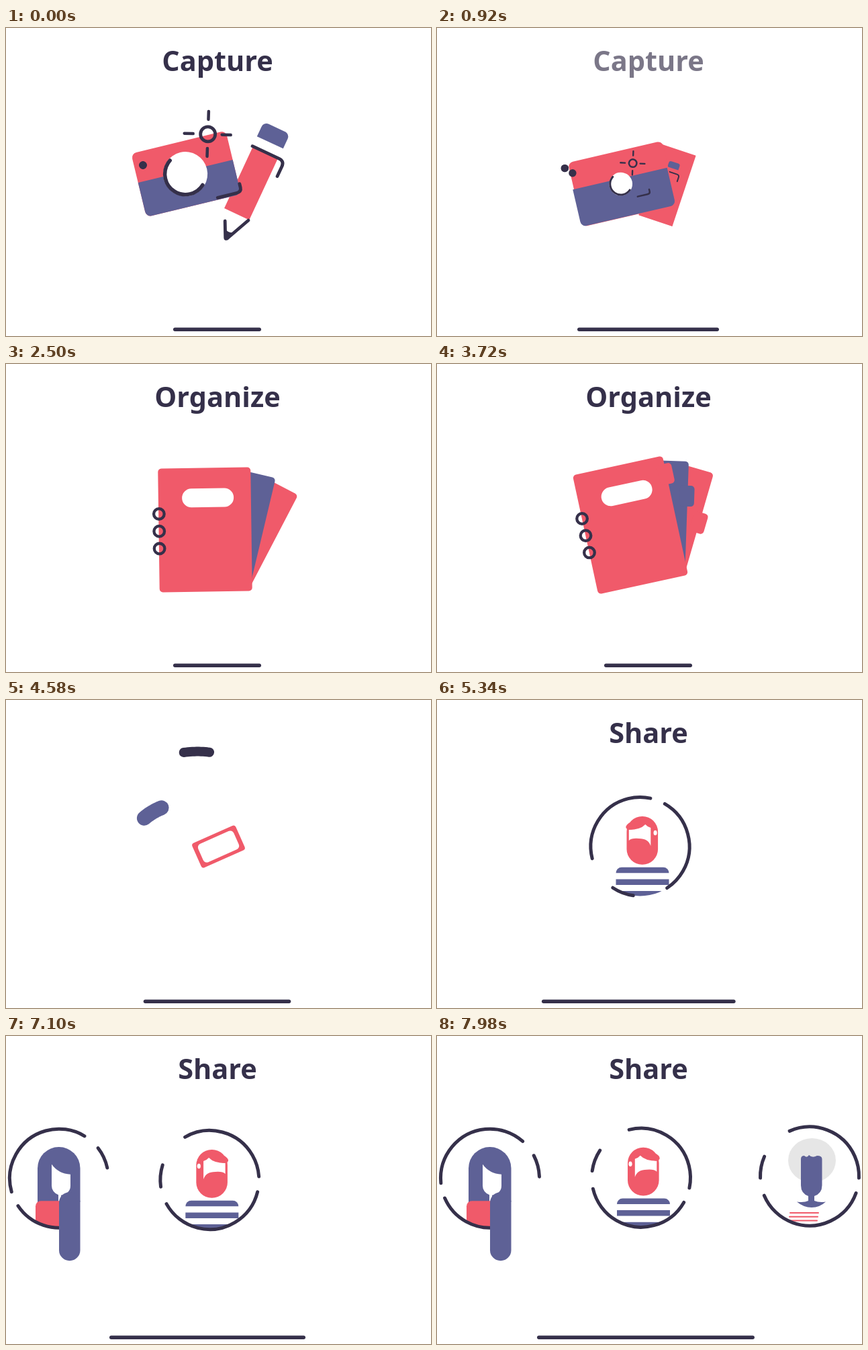
Write an HTML page with a canvas that moves like this. It is 633 px wide and 458 px high and loops after 8 s.

```html
<!DOCTYPE html>
<html lang="en">
<head>
<meta charset="utf-8">
<title>Capture, Organize, Share</title>
<style>
html, body { margin: 0; width: 100%; height: 100%; overflow: hidden; background: #fff; }
canvas { display: block; }
</style>
</head>
<body>
<canvas id="stage" width="633" height="458"></canvas>
<script>
const ctx = document.getElementById('stage').getContext('2d');
const DARK = '#35304a', RED = '#f05a6a', BLUE = '#5e6196', WHITE = '#fff', GRAY = '#e6e6e6';
const LOOP = 8000, RAD = Math.PI / 180, RING = 73.5;

const ramp = (t, from, to) => Math.max(0, Math.min(1, (t - from) / (to - from)));
const ease = (t, from, to) => { const p = ramp(t, from, to); return p * p * (3 - 2 * p); };
const pulse = (t, from, to) => Math.sin(Math.PI * ramp(t, from, to));
const mix = (a, b, p) => a + (b - a) * p;

// Eases a pose through steps of the form [from, to, next pose]; it rests between them.
const stages = (t, pose, ...steps) => steps.reduce(
  (now, [from, to, next]) => now.map((v, i) => mix(v, next[i], ease(t, from, to))), pose);

function at(x, y, angle, draw, sx = 1, sy = sx) {
  ctx.save();
  ctx.translate(x, y);
  ctx.rotate(angle * RAD);
  ctx.scale(sx, sy);
  draw();
  ctx.restore();
}
function turned(x, y, angle) {
  const c = Math.cos(angle * RAD), s = Math.sin(angle * RAD);
  return [x * c - y * s, x * s + y * c];
}
function fill(d, color) { ctx.fillStyle = color; ctx.fill(new Path2D(d)); }
function stroke(d, width = 4.8) {
  ctx.strokeStyle = DARK; ctx.lineWidth = width;
  ctx.stroke(new Path2D(d));
}
function box(x, y, w, h, r, color) {
  if (w < 0.5 || h < 0.5) return;
  ctx.fillStyle = color;
  ctx.beginPath(); ctx.roundRect(x, y, w, h, r); ctx.fill();
}
function oval(x, y, rx, ry, color, angle = 0) {
  ctx.fillStyle = color;
  ctx.beginPath(); ctx.ellipse(x, y, rx, ry, angle * RAD, 0, 7); ctx.fill();
}
function arc(x, y, r, start, length, width = 5) {
  if (length <= 0 || width <= 0) return;
  ctx.strokeStyle = DARK; ctx.lineWidth = width;
  ctx.beginPath(); ctx.arc(x, y, r, start * RAD, (start + length) * RAD); ctx.stroke();
}

// A thick trail that follows a spiral around a point.
function swoosh(t, x, y, color, width, [from, to], [r0, r1], [a0, a1]) {
  const head = ramp(t, from, to);
  if (head <= 0 || head >= 1) return;
  ctx.strokeStyle = color;
  ctx.lineWidth = width * Math.min(1, head * 5, (1 - head) * 5);
  ctx.beginPath();
  for (let i = 0; i <= 12; i++) {
    const p = Math.max(0, head - 0.01 * i);
    const [dx, dy] = turned(mix(r0, r1, p), 0, mix(a0, a1, p));
    ctx.lineTo(x + dx, y + dy);
  }
  ctx.stroke();
}

function titles(t) {
  ctx.textAlign = 'center';
  ctx.font = '700 41.5px "Noto Sans", "Open Sans", sans-serif';
  ctx.fillStyle = DARK;
  for (const [text, start, end] of [['Capture', -400, 800], ['Organize', 1400, 4050], ['Share', 4600, LOOP]]) {
    ctx.globalAlpha = ramp(t, start, start + 400) - ramp(t, end, end + 350);
    ctx.fillText(text, 315, 63.5);
  }
  ctx.globalAlpha = 1;
}

function underline(t) {
  const half = 65.5 + 66 * pulse(t, 700, 1768) + 81 * pulse(t, 4000, 4712);
  const [left, right] = stages(t, [314.5 - half, 314.5 + half], [4712, 5400, [154, 446]], [7500, 8000, [149, 473]]);
  box(left, 445.5, right - left, 5.5, 2.75, DARK);
}

const sway = t => t < 700 ? Math.sin(t / 350 * Math.PI) : 0;

// The pencil's body, which becomes the binder's cover and then a head: centre, angle, size, radius.
const coverPose = t => stages(t, [365, 231, 25 - sway(t), 41, 101, 0],
  [750, 1520, [189.5, 255, -26.6, 136, 181, 6]],
  [1520, 2450, [296.5, 246.5, -0.8, 138, 184, 5]],
  [2500, 3400, [288, 239.5, -12.2, 137, 181, 5]],
  [4050, 4580, [316.5, 218, -24, 71, 40, 4]],
  [4580, 5200, [306, 209, 0, 46.5, 71.5, 23]]);

// The camera's two halves, which become pages fanned from the cover's lower right corner.
function pagePose(t, i) {
  const [x, y, angle, w, h] = coverPose(t);
  const [dx, dy] = turned(0.47 * w, 0.478 * h, angle);
  const fan = [x + dx, y + dy, angle + 14.2 * i];
  return stages(t, [350, 247, -13.6 + sway(t), 145, 97, 8],
    [750, 1520, [380 + 14 * i, 376, -9.2, 138, 104, 5]],
    [1520, 2450, [...fan, 55, h * (0.98 - 0.065 * i), 5]],
    [4050, 4350, [...fan, 0, 0, 0]]);
}

function tab(t, x, y, color) {
  const out = 10 * (ease(t, 3350, 3700) - ease(t, 4050, 4250));
  if (out > 0.1) box(x - 12, y, 12 + out, 31, 5, color);
}

function pages(t) {
  const whole = ease(t, 850, 1250), tools = 1 - ease(t, 800, 1050);
  for (const i of [2, 1]) {
    const [x, y, angle, w, h, r] = pagePose(t, i), color = i === 2 ? RED : BLUE;
    const cut = i === 1 ? 44.5 * (1 - whole) : 0;
    if (w > 1) at(x, y, angle, () => {
      box(-w, cut - h, w, h - cut, cut > 1 ? [0, 0, r, r] : r, color);
      tab(t, 0, 12 + 25 * i - h - 1, color);
    });
  }
  const [x, y, angle, w, h] = pagePose(t, 1);
  if (tools > 0) at(x, y, angle, () => at(-w / 2, -h / 2, 0, () => {
    stroke('M37.5 45.5H66Q74 45.5 74 39V33');
    oval(-1, 0, 33, 33, WHITE);
    arc(-1, 0, 30.5, 46, 189, 5.5);
    at(45.5, -49.7, 15.6, () => {
      arc(0, 0, 11, 0, 360, 4.8);
      stroke('M0-34V-22M0 21V33M-35 0H-22M21 0H34', 4.5);
    });
  }, tools));
}

function cover(t) {
  if (t >= 5200) return;
  const [x, y, angle, w, h, r] = coverPose(t), tools = 1 - ease(t, 750, 1050);
  const [lx, ly, lw, lh, lr] = stages(t, [4.8, -47.5, 0, 0, 0],
    [1900, 2400, [4.8, -47.5, 77, 28, 14]],
    [4050, 4580, [0, 0, 58, 30, 6]],
    [4580, 5200, [-3.5, -9, 33, 24, 4]]);
  at(x, y, angle, () => {
    box(-w / 2, -h / 2, w, h, r, RED);
    tab(t, w / 2, 12 - h / 2, RED);
    box(lx - lw / 2, ly - lh / 2, lw, lh, lr, WHITE);
    if (tools > 0) at(0, 0, 0, () => {
      box(-21.5, -91, 43, 24, [8, 8, 0, 0], BLUE);
      stroke('M-21.5-51H22Q31-51 31-42V-26');
      fill('M-6 78Q0 81 6 78L1 93Z', DARK);
      stroke('M-11.6 67L-.5 89.5Q1 92 3 88L19.6 51.5');
    }, tools);
  });
}

// The camera's dot splits into three, which open into binder rings.
function rings(t) {
  const [x, y, angle] = coverPose(t);
  const open = ease(t, 1520, 2400), size = 1 - ease(t, 4050, 4300);
  for (let i = 0; i < 3; i++) {
    const [dx, dy] = turned(-68.3, -24.5 + 25.8 * i, angle);
    const [cx, cy] = stages(t, [204, 204],
      [800, 1520, i === 1 ? [176, 361] : [22.5, 265]], [1520, 2400, [x + dx, y + dy]]);
    arc(cx, cy, mix(2.8, 7.8, open) * size, 0, 360, mix(5.8, 4.3, open) * size);
  }
}

function paperclip(t) {
  const u = (t - 1520) / 500;
  at(337 - 12 * u, 38 - 80 * u * u, 29, () => {
    ctx.strokeStyle = DARK; ctx.lineWidth = 3.6;
    ctx.beginPath(); ctx.roundRect(-9, -26.5, 18, 53, 9); ctx.stroke();
  });
}

// Three dashes drawn by a growing pen; the last one may lag behind.
function dashedRing(x, y, rotation, pen, lastPen = pen) {
  const last = Math.min(116, 137 * lastPen);
  arc(x, y, RING, rotation, 137 * pen);
  arc(x, y, RING, rotation + 158, Math.min(25.5, 137 * pen));
  arc(x, y, RING, rotation + 342 - last, last);
}
function insideRing(draw) {
  ctx.save();
  ctx.beginPath(); ctx.arc(0, 0, RING, 0, 7); ctx.clip();
  draw();
  ctx.restore();
}

function beardedMan(t) {
  swoosh(t, 302, 218, DARK, 14, [4350, 5100], [152, 114], [231, 359]);
  swoosh(t, 302, 218, BLUE, 22, [4350, 5250], [121, 4], [186, 316]);
  if (t < 4950) return;
  const [x, y] = stages(t, [302.5, 218], [6200, 7900, [304, 210.7]]);
  const drop = 45 * (1 - ease(t, 5000, 5300));
  at(x, y, 0, () => {
    insideRing(() => {
      for (let i = 0; i < 3; i++) box(-36, 30.8 + 17.6 * i + drop, 79, 8.5, i ? 0 : [9, 9, 0, 0], BLUE);
    });
    if (t >= 5200) at(3.3, 0, 0, () => {
      box(-23.3, -45, 46.6, 71.8, 23, RED);
      fill('M-20-25Q-3-25 4.5-33Q8-29 12.5-28V-1Q9-12-5-12Q-16-13-20-9Z', WHITE);
      oval(-14.5, -31.5, 10.5, 5.5, RED, -20);
      oval(19.3, -20.5, 2.6, 3.8, WHITE);
    }, mix(1, -1, ease(t, 6750, 7050)), 1);
  });
  const spin = 0.0181 * (t - 6160) - 90 * (1 - ease(t, 4950, 5700));
  dashedRing(x, y, spin - 3, ease(t, 5000, 5450));
}

function longHair(t) {
  const pop = ease(t, 6380, 6620), y = 211.7, x = mix(83, 79, ease(t, 6160, 6800));
  const pen = 0.41 * ease(t, 5950, 6160) + 0.59 * ease(t, 6160, 6700);
  at(x, y, 0, () => {
    box(-32, -46.7, 63.5, 82, [31.7, 31.7, 0, 0], BLUE);
    fill('M-11-21Q-1-7 17-6V11A14 14 0 0 1 3 25V36H-1V24.5A14 14 0 0 1-11 11Z', WHITE);
    insideRing(() => box(-35, 33.5, 66, 50, [8, 8, 0, 0], RED));
  }, pop);
  dashedRing(x, y, 174.5 + 0.0118 * (t - 7980), pen, 0.55 * ease(t, 6250, 6800));
  if (pop > 0) at(x, y, 0, () => box(0, 20.5, 31.5, mix(32, 102, ease(t, 6600, 7050)), 15.7, BLUE), pop);
  swoosh(t, 79, 212, BLUE, 33, [5800, 6500], [83, 37], [-136, 72]);
  swoosh(t, 79, 212, RED, 23, [5800, 6500], [60, 102], [-34, 108]);
}

function tallHead(t) {
  at(555, 209, 0, () => {
    oval(3.5, -24, 35.5, 33, GRAY);
    fill('M-13-26Q-13-31-8-31Q-4-27-1-32Q4-27 11-31Q18.5-31 18.5-26V13Q18.5 25 7 29V36Q14 39 24 37.5Q15 46 3 46Q-9 46-19 37.5Q-8 39-2 36V29Q-13 25-13 13Z', BLUE);
    for (let i = 0; i < 3; i++) box(-30 - i, 53 + 5.7 * i, 44, 2, 1, RED);
  }, ease(t, 7550, 7850));
  dashedRing(555, 208.5, 20 + 0.0181 * (t - 7980), ease(t, 7400, 7850));
  swoosh(t, 555, 209, BLUE, 28, [7300, 7750], [121, 4], [186, 316]);
}

function draw(t) {
  ctx.fillStyle = WHITE;
  ctx.fillRect(0, 0, 633, 458);
  ctx.lineCap = ctx.lineJoin = 'round';
  titles(t);
  underline(t);
  const binder = t < 1100 ? [cover, pages] : [pages, cover];
  for (const part of [...binder, rings, paperclip, beardedMan, longHair, tallHead]) part(t);
}

const began = performance.now();
function tick() {
  draw((performance.now() - began) % LOOP);
  requestAnimationFrame(tick);
}
tick();
</script>
</body>
</html>
```
